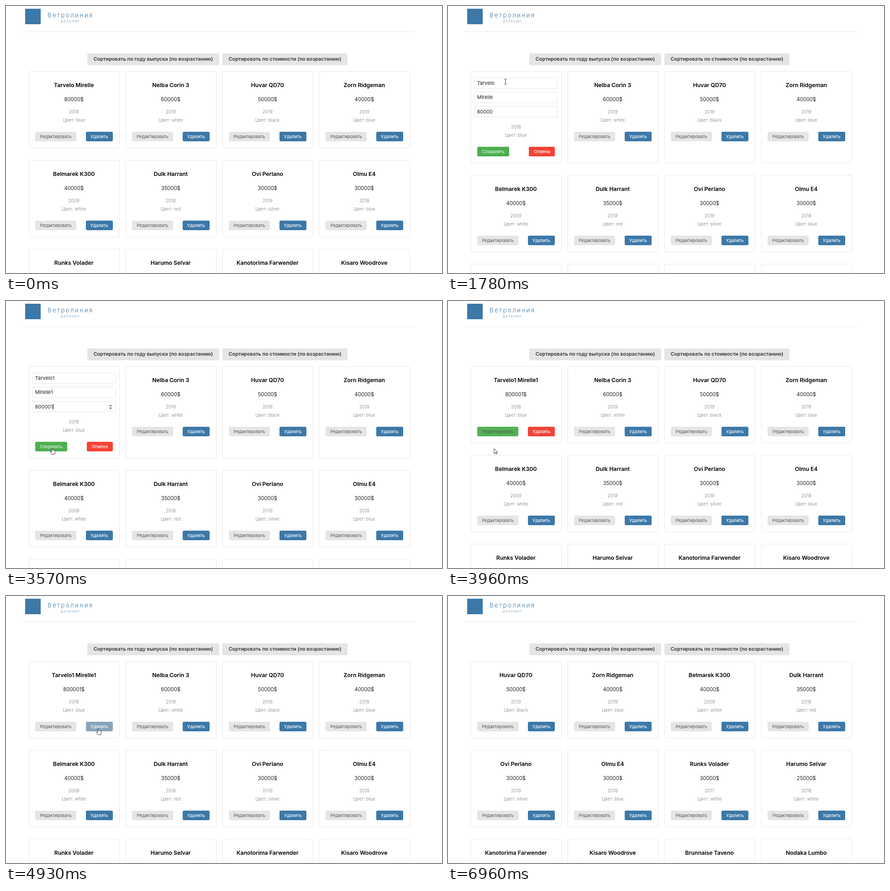
Recreate the animation shown at these times as an HTML page. Size 955 by 586 pixels, loop 7.03 s.

```html
<!DOCTYPE html>
<html lang="ru">
<head>
<meta charset="utf-8">
<title>Каталог автомобилей</title>
<style>
  html, body { margin: 0; width: 100%; height: 100%; overflow: hidden; background: #fff; }
  body { position: relative; font-family: Inter, "Noto Sans", sans-serif; color: #222; }
  div, svg { position: absolute; }
  .mark { left: 42px; top: 6px; width: 34px; height: 34px; background: #3c78a8; }
  .brand, .sub { left: 80px; width: 120px; text-align: center; white-space: nowrap; color: #3c78a8; line-height: 20px; }
  .brand { top: 10px; font-size: 13.2px; font-weight: 300; letter-spacing: 2.5px; text-indent: 2.5px; }
  .sub { top: 23.5px; font-size: 6px; font-weight: 300; letter-spacing: 1.7px; text-indent: 1.7px; }
  .rule { left: 36px; top: 56px; width: 862px; height: 1px; background: #e9e9e9; }
  .sort { top: 104px; height: 25.5px; line-height: 25.5px; border-radius: 3px; background: #e5e5e5;
          color: #333; font-size: 10.87px; font-weight: 600; text-align: center; white-space: nowrap; }
  .scene { inset: 0; }
  .card { width: 198.5px; border-radius: 4px; box-shadow: inset 0 0 0 1px #e8e8e8; }
  .line { left: -.5px; width: 100%; text-align: center; line-height: 20px; white-space: nowrap; }
  .title { font-size: 12.3px; font-weight: 600; color: #000; }
  .price { font-size: 11.2px; }
  .note { font-size: 9.75px; color: #999; }
  .btn { height: 21px; line-height: 21px; padding: 0 10.5px; border-radius: 3px; font-size: 9.4px; white-space: nowrap; }
  .left { left: 14px; background: #e5e5e5; color: #555; }
  .right { right: 14.5px; background: #3c78a8; color: #fff; font-weight: 500; }
  .left.save { color: #fff; }
  .live .left { animation: left 7030ms ease infinite; }
  .live .right { animation: right 7030ms ease infinite; }
  .field { left: 7.5px; width: 182.5px; height: 24.6px; line-height: 24.6px; box-sizing: border-box; padding-left: 6px;
           border-radius: 3px; box-shadow: inset 0 0 0 1px #e6e6e6; font-size: 11px; white-space: nowrap; }
  .caret { display: inline-block; width: 1px; height: 12px; margin-right: -1px; background: #000; vertical-align: -2px; }
  .spin { right: 8px; top: 7px; }
  #pointer { left: 0; top: 0; width: 0; height: 0; animation: move 7030ms ease-in-out infinite; }
  #pointer svg { overflow: visible; left: 0; top: 0; width: 1px; height: 1px; }
  .glow { left: -8px; top: -8px; width: 16px; height: 16px; border-radius: 50%; background: #f8f32b; }
</style>
</head>
<body>
<div class="mark"></div>
<div class="brand">Ветролиния</div>
<div class="sub">ДАЛЕНИР</div>
<div class="rule"></div>
<div class="sort" style="left:178px;width:289px">Сортировать по году выпуска (по возрастанию)</div>
<div class="sort" style="left:474px;width:274px">Сортировать по стоимости (по возрастанию)</div>
<main id="scenes"></main>
<div id="pointer"></div>
<script>
const LOOP = 7030;
const sheet = document.head.appendChild(document.createElement('style'));
let css = '', count = 0;

function keyframes(name, stops) {
  css += `@keyframes ${name}{` +
    stops.map(([ms, rule]) => `${(ms / LOOP * 100).toFixed(4)}%{${rule}}`).join('') + '}\n';
}

// Inline style that shows an element only from one time to another
function during(from, to) {
  const name = 'show' + count++;
  const stops = [[from, 'opacity:1'], [to, 'opacity:0']];
  if (from > 0) stops.unshift([0, 'opacity:0']);
  keyframes(name, stops);
  return `opacity:0;animation:${name} ${LOOP}ms step-end infinite`;
}

const cars = [
  ['Tarvelo Mirelle', 80000, 2018, 'blue'],
  ['Nelba Corin 3', 60000, 2019, 'white'],
  ['Huvar QD70', 50000, 2019, 'black'],
  ['Zorn Ridgeman', 40000, 2019, 'blue'],
  ['Belmarek K300', 40000, 2009, 'white'],
  ['Dulk Harrant', 35000, 2018, 'red'],
  ['Ovi Perlano', 30000, 2019, 'silver'],
  ['Olmu E4', 30000, 2018, 'blue'],
  ['Runks Volader', 30000, 2017, 'white'],
  ['Harumo Selvar', 25000, 2018, 'white'],
  ['Kanotorima Farwender', 25000, 2018, 'white'],
  ['Kisaro Woodrove', 25000, 2018, 'blue'],
  ['Brunnaise Taveno', 25000, 2018, 'red'],
  ['Nodaka Lumbo', 25000, 2018, 'white']
];
const saved = [['Tarvelo1 Mirelle1', 800001, 2018, 'blue'], ...cars.slice(1)];

const line = (kind, y, text) => `<div class="line ${kind}" style="top:${y - 10}px">${text}</div>`;
const button = (kind, y, text) => `<div class="btn ${kind}" style="top:${y}px">${text}</div>`;
const caret = (from, to) => `<span class="caret" style="${during(from, to)}"></span>`;

const notes = (y, year, color) => line('note', y, year) + line('note', y + 18, 'Цвет: ' + color);

const details = ([name, price, year, color]) =>
  line('title', 31.4, name) + line('price', 62, price + '$') + notes(89.5, year, color) +
  button('left', 133, 'Редактировать') + button('right', 133, 'Удалить');

const field = (y, text, focus, typed, blur, extra = '') =>
  `<div class="field" style="top:${y}px">${text}${caret(focus, typed)}` +
  `<span style="${during(typed, 5000)}">1</span>${caret(typed, blur)}${extra}</div>`;

function form() {
  const spin = `<svg class="spin" width="6" height="11" fill="#444" style="${during(2760, 3955)}">` +
    '<path d="M0 4L3 1L6 4ZM0 7L3 10L6 7Z"/></svg>';
  return field(14, 'Tarvelo', 1960, 2240, 2440) +
    field(45.3, 'Mirelle', 2440, 2540, 3015) +
    field(76.7, '80000', 3015, 3220, 3955, spin) +
    notes(122.5, 2018, 'blue') +
    button('left save', 166, 'Сохранить') + button('right', 166, 'Отмена');
}

function scene(from, to, list, editing) {
  const grow = editing ? 33 : 0;
  const cards = list.slice(0, 12).map((car, i) => {
    const row = Math.floor(i / 4);
    const top = 143 + row * 195 + (row ? grow : 0);
    const height = 168.5 + (row ? 0 : grow);
    return `<div class="card${i ? '' : ' live'}" style="left:${50 + i % 4 * 212}px;top:${top}px;height:${height}px">` +
      (editing && !i ? form() : details(car)) + '</div>';
  });
  return `<div class="scene" style="${during(from, to)}">${cards.join('')}</div>`;
}

document.getElementById('scenes').innerHTML =
  scene(0, 1015, cars) +
  scene(1015, 3955, cars, true) +
  scene(3955, 5465, saved) +
  scene(5465, 6495, cars.slice(1)) +
  scene(6495, LOOP, cars.slice(2));

const tint = stops => stops.map(([ms, color]) => [ms, 'background:' + color]);
const GREY = '#e5e5e5', GREEN = '#4caf50', BLUE = '#3c78a8', RED = '#f44336', HOVER = '#ccc';
keyframes('left', tint([[0, GREY], [1015, GREY], [1315, GREEN], [3945, GREEN], [4245, GREY], [LOOP, GREY]]));
keyframes('right', tint([[0, BLUE], [1015, BLUE], [1315, RED], [3945, RED], [4245, BLUE],
  [4840, BLUE], [5140, HOVER], [6830, HOVER], [6950, BLUE], [LOOP, BLUE]]));

keyframes('move', [
  [0, 704, 474], [260, 704, 474], [950, 110, 285], [1100, 110, 285], [1740, 126, 166],
  [2290, 126, 166], [2430, 118, 201], [2560, 118, 201], [2820, 115, 239], [3270, 115, 239],
  [3570, 101, 322], [3900, 101, 322], [3950, 101, 324], [4010, 101, 324], [4580, 345, 300],
  [4620, 345, 300], [4860, 202, 290], [LOOP, 202, 290]
].map(([ms, x, y]) => [ms, `transform:translate(${x}px,${y}px)`]));

const shapes = {
  arrow: '<path d="M0 0V11L2.6 8.7L4.3 12.4L6 11.6L4.4 8.1H8Z" fill="#fff" stroke="#222" stroke-width=".9"/>',
  beam: '<path d="M-2.5 -5.5H-.8L0 -5L.8 -5.5H2.5M0 -5V5M-2.5 5.5H-.8L0 5L.8 5.5H2.5" fill="none" stroke="#333"/>',
  hand: '<path d="M-1 1.2Q0 -.4 1 1.2V5.4Q2 4.4 3 5.7Q4 5 5 6.2Q6.8 5.8 6.8 7.6V10.6L5.6 14.5H-.6L-3.8 9.6Q-4 7.6 -2.4 8.2L-1 9.5Z"' +
    ' fill="#fff" stroke="#222" stroke-width=".9"/>'
};
const pointers = [
  ['arrow', 260, 880], ['hand', 880, 1015], ['arrow', 1015, 1660], ['beam', 1660, 3480],
  ['hand', 3480, 3955], ['arrow', 3955, 4830], ['hand', 4830, 6830]
];
const clicks = [[950, 1280], [1900, 2170], [2430, 2560], [3015, 3260], [3895, 3955], [5465, 5830], [6495, 6630]];

// Click marks fade out while the button is let go
const glow = ([from, to], i) => {
  keyframes('glow' + i, [[0, 'opacity:0'], [from - 1, 'opacity:0'], [from, 'opacity:.8'],
    [to, 'opacity:0'], [LOOP, 'opacity:0']]);
  return `<div class="glow" style="opacity:0;animation:glow${i} ${LOOP}ms ease-in infinite"></div>`;
};

document.getElementById('pointer').innerHTML = clicks.map(glow).join('') +
  pointers.map(([kind, from, to]) => `<svg style="${during(from, to)}">${shapes[kind]}</svg>`).join('');

sheet.textContent = css;
</script>
</body>
</html>
```
